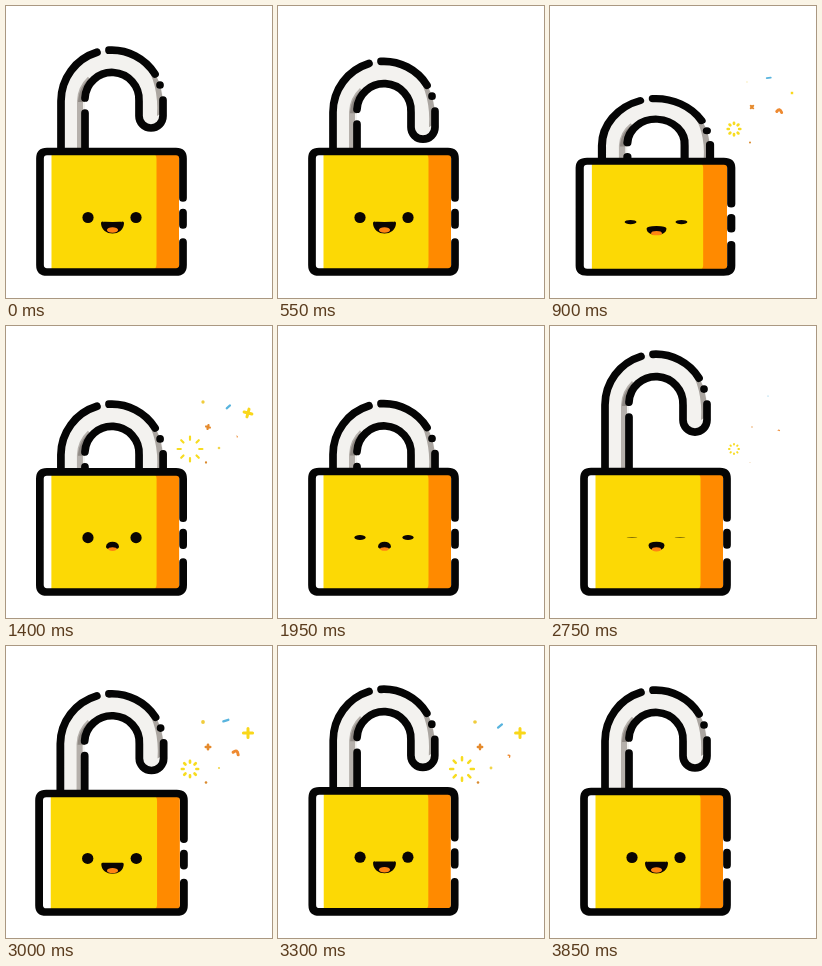
Animation of 266x292 px, one loop 3900 ms. Source, as an HTML page:

```html
<!DOCTYPE html>
<html>
<head>
<meta charset="utf-8">
<title>Padlock</title>
<style>
html, body { margin: 0; width: 100%; height: 100%; overflow: hidden; background: #fff; }
svg { display: block; width: 266px; height: 292px; }
.line { fill: none; stroke: #050505; stroke-width: 7.7; stroke-linecap: round; stroke-linejoin: round; }
.shade { fill: none; stroke: #b5b0ab; }
</style>
</head>
<body>
<svg viewBox="0 0 266 292">
  <g id="lock">
    <g id="shackle">
      <path fill="#f3f2ef" d="M55 200V95A51 51 0 0 1 157 95V110A12 12 0 0 1 133 110V95A27 27 0 0 0 79 95V200Z"/>
      <path class="shade" stroke-width="6" d="M74 200V95A32 32 0 0 1 84 73"/>
      <path fill="#8f8984" d="M72 96Q73 79 86 71L88 76Q79 84 79 96Z"/>
      <path fill="#aaa5a0" d="M138 56Q158 70 157 106L151 110Q153 78 138 56Z"/>
      <path class="line" d="M55 200V95A51 51 0 0 1 91 46.3M103 44.2A51 51 0 0 1 149 68M154 79h.01M157 94V110A12 12 0 0 1 133 110V95A27 27 0 0 0 79 92M79 107V200"/>
    </g>
    <rect x="34" y="145.5" width="143" height="120.5" rx="7" fill="#fff"/>
    <path fill="#ff8a00" d="M140 148H173V263H140Z"/>
    <path fill="#fcd905" d="M45.5 148H147Q150.5 148 150.5 153V258Q150.5 263 147 263H45.5Z"/>
    <path class="line" d="M177 192V152.5Q177 145.5 170 145.5H41Q34 145.5 34 152.5V259Q34 266 41 266H170Q177 266 177 259V236M177 206.5V219"/>
    <ellipse id="eyeL" cx="82" cy="211.5" rx="5.6" fill="#0a0503"/>
    <ellipse id="eyeR" cx="130" cy="211.5" rx="5.6" fill="#0a0503"/>
    <path id="mouth" fill="#0a0503" stroke="#0a0503" stroke-width="3" stroke-linejoin="round"/>
    <ellipse id="tongue" cx="106.5" fill="#ff8412"/>
  </g>
  <g id="burst" fill="none" stroke-linecap="round"></g>
</svg>
<script>
const LOOP = 3900, STEP = 50, BURST = LOOP / 2, BURST_AT = 650, SETTLED = 700;
const CLOSE = 430, SQUASH = 740, OPEN = 2520, LAND = 2900, BLINKS = [830, 2022, 2740];

const $ = id => document.getElementById(id);
const mix = (a, b, k) => a + (b - a) * k;
const ramp = (t, a, b) => {
  const k = Math.min(1, Math.max(0, (t - a) / (b - a)));
  return k * k * (3 - 2 * k);
};
const bell = (x, width, power = 2) => Math.exp(-(Math.abs(x / width) ** power));
const spring = x => x < 0 ? 0 : 1 - Math.cos(Math.PI * x / 320) * bell(x, 427);
const wobble = x => x < 0 ? 0 : 1.26 * Math.sin(Math.PI * x / 280) * bell(x, 350);

// Path for a size, turn in degrees per ms, fall in px per ms, lifetime
const kinds = {
  plus: { path: s => `M${-s} 0H${s}M0 ${-s}V${s}`, turn: .3, fall: 0, life: 1100 },
  dash: { path: s => `M${-s} ${s * .8}L${s} ${-s * .8}`, turn: -.07, fall: .018, life: 1100 },
  hook: { path: s => `M${-s * .7} ${-s * .7}Q${s * 1.3} ${-s} ${s * .4} ${s}`, turn: .1, fall: .01, life: 900 },
  dot: { path: () => 'M0 0h.01', turn: 0, fall: 0, life: 1100 }
};
// Resting place, colour, kind, size, birth
const bits = [
  [242, 87, '#f9d71a', 'plus', 4.6, 180],
  [202, 101, '#e58a2c', 'plus', 2.2, 90],
  [222, 80, '#58b4de', 'dash', 2, 90],
  [231, 110, '#ee8a31', 'hook', 2.8, 70],
  [197, 76, '#f0cc3c', 'dot', 1.9, 180],
  [213, 122, '#f1d54a', 'dot', 1.5, 250],
  [200, 136.5, '#d98a2e', 'dot', 1.3, 90]
];

function set(el, attrs) {
  for (const k in attrs) el.setAttribute(k, attrs[k]);
}
function addPath(stroke) {
  const p = document.createElementNS('http://www.w3.org/2000/svg', 'path');
  set(p, { stroke });
  return $('burst').appendChild(p);
}
const pieces = bits.map(b => addPath(b[2]));
const ring = addPath('#f7dc20');

function drawRing(age) {
  const inner = 3.2 + age * .008, outer = 3.2 + age * .0123;
  let d = '';
  for (let i = 0; i < 8; i++) {
    const a = i * Math.PI / 4, c = Math.cos(a), s = Math.sin(a);
    d += `M${184 + inner * c} ${123 + inner * s}L${184 + outer * c} ${123 + outer * s}`;
  }
  const w = 2.7 * ramp(age, 60, 200) * (1 - ramp(age, 650, 1000));
  set(ring, { d, 'stroke-width': w });
}

function drawBits(age) {
  const late = age - SETTLED;
  bits.forEach(([x, y, , name, size, birth], i) => {
    const kind = kinds[name];
    const s = size * ramp(age, birth, birth + 230) * (1 - ramp(age, kind.life - 450, kind.life));
    const fall = kind.fall * late;
    set(pieces[i], {
      d: kind.path(s),
      'stroke-width': name === 'dot' ? s * 2 : Math.min(3, s * 1.2),
      transform: `translate(${x + fall * .4} ${y + fall}) rotate(${kind.turn * late})`
    });
  });
}

function drawFace(t) {
  const shut = Math.max(...BLINKS.map(b => bell(t - b, 84, 4)));
  for (const id of ['eyeL', 'eyeR']) set($(id), { ry: 5.6 * (1 - .96 * shut) });

  const smile = 1 - ramp(t, 720, 1120) + ramp(t, 2550, 3100);
  const w = mix(5, 10, smile), l = 106.5 - w, r = 106.5 + w;
  const y = mix(220.5, 217, smile), top = mix(216, 217.5, smile), low = mix(222, 229, smile);
  set($('mouth'), { d: `M${l} ${y}C${l} ${top} ${r} ${top} ${r} ${y}C${r} ${low} ${l} ${low} ${l} ${y}Z` });
  set($('tongue'), { cy: mix(223, 224, smile), rx: mix(4.3, 5.6, smile), ry: mix(1.8, 2.8, smile) });
}

function draw(t) {
  const q = wobble(t - SQUASH) + .2 * wobble(t - LAND);
  set($('lock'), {
    transform: `translate(106 270) scale(${1 + .06 * q} ${1 - .078 * q}) translate(-106 -270)`
  });
  set($('shackle'), { transform: `translate(0 ${33.5 * (ramp(t, CLOSE, 740) - spring(t - OPEN))})` });
  drawFace(t);

  const age = (t - BURST_AT + LOOP) % BURST;
  drawRing(age);
  drawBits(age);
}

const start = performance.now();
function tick() {
  const t = (performance.now() - start) % LOOP;
  draw(Math.floor(t / STEP) * STEP);
  requestAnimationFrame(tick);
}
tick();
</script>
</body>
</html>
```
